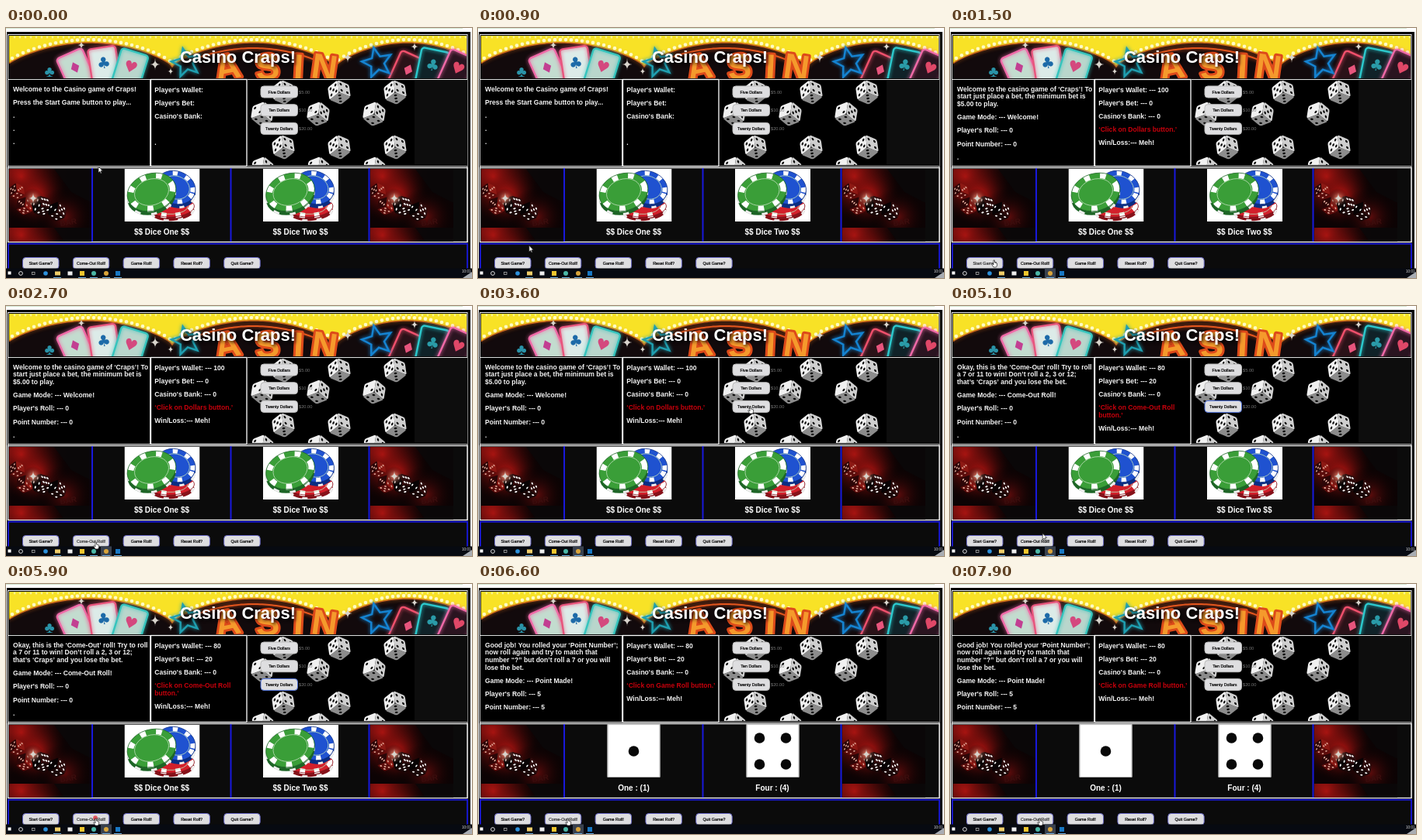
Recreate the animation shown at these times as an HTML page with a canvas. Size 600 by 323 pixels, loop 8000 ms.

```html
<!DOCTYPE html>
<html lang="en">
<head>
<meta charset="utf-8">
<title>Casino Craps</title>
<style>
html, body { margin: 0; width: 100%; height: 100%; overflow: hidden; background: #fff; }
canvas { display: block; }
</style>
</head>
<body>
<canvas id="stage" width="600" height="323"></canvas>
<script>
const c = document.getElementById('stage').getContext('2d');
const LOOP = 8000, STEP = 100, TAU = Math.PI * 2;
const SANS = '"Liberation Sans", Arial, sans-serif';
const BLUE = '#1818dc';

function rect(x, y, w, h, fill) { c.fillStyle = fill; c.fillRect(x, y, w, h); }
function frame(x, y, w, h, color, lw = 1) {
  c.strokeStyle = color; c.lineWidth = lw; c.strokeRect(x, y, w, h);
}
function disc(x, y, r, fill) {
  c.fillStyle = fill; c.beginPath(); c.arc(x, y, r, 0, TAU); c.fill();
}
function poly(points, fill) {
  c.beginPath();
  for (const [x, y] of points) c.lineTo(x, y);
  c.closePath();
  c.fillStyle = fill; c.fill();
}
function text(s, x, y, size, fill, align = 'left', weight = 'bold') {
  c.font = `${weight} ${size}px ${SANS}`;
  c.textAlign = align; c.fillStyle = fill; c.fillText(s, x, y);
}
function clipped(x, y, w, h, draw) {
  c.save(); c.beginPath(); c.rect(x, y, w, h); c.clip(); draw(); c.restore();
}
function glow(x, y, r, color) {
  const g = c.createRadialGradient(x, y, 0, x, y, r);
  g.addColorStop(0, color); g.addColorStop(1, 'transparent');
  rect(x - r, y - r, 2 * r, 2 * r, g);
}

function pips(n) {
  const p = [];
  if (n % 2) p.push([.5, .5]);
  if (n > 1) p.push([.25, .25], [.75, .75]);
  if (n > 3) p.push([.75, .25], [.25, .75]);
  if (n > 5) p.push([.25, .5], [.75, .5]);
  return p;
}
// A cube seen corner-on: three faces that meet at (x, y).
function cube(x, y, r, turn, faces, colors, dot) {
  faces.forEach((n, i) => {
    const a = turn + i * TAU / 3, b = a + TAU / 3;
    c.save();
    c.transform(r * Math.cos(a), r * Math.sin(a), r * Math.cos(b), r * Math.sin(b), x, y);
    c.fillStyle = colors[i];
    c.beginPath(); c.roundRect(0, 0, 1, 1, .16); c.fill();
    for (const [u, v] of pips(n)) disc(u, v, .1, dot);
    c.restore();
  });
}

// ---- Neon banner ----
function neon(color, lw, trace) {
  c.save();
  c.shadowColor = color; c.shadowBlur = 5; c.strokeStyle = color; c.lineWidth = lw;
  c.beginPath(); trace(); c.stroke(); c.restore();
}
function star(x, y, r) {
  for (let i = 0; i < 10; i++) {
    const a = i * TAU / 10 - 1.8, d = i % 2 ? r * .45 : r;
    c.lineTo(x + d * Math.cos(a), y + d * Math.sin(a));
  }
  c.closePath();
}
function sparkle(x, y, r) {
  c.fillStyle = '#d8d4cc';
  c.beginPath(); c.moveTo(x, y - r);
  for (const [dx, dy] of [[1, 0], [0, 1], [-1, 0], [0, -1]])
    c.quadraticCurveTo(x, y, x + dx * r * .8, y + dy * r);
  c.fill();
}
function card(x, y, turn, color, fill, suit, suitColor) {
  c.save(); c.translate(x, y); c.rotate(turn);
  const outline = () => c.roundRect(-18, -22, 36, 58, 4);
  c.beginPath(); outline(); c.fillStyle = fill; c.fill();
  neon(color, 2.4, outline);
  c.font = '20px "DejaVu Sans", sans-serif'; c.textAlign = 'center';
  c.fillStyle = suitColor; c.fillText(suit, 0, 5);
  c.restore();
}
// Three dark mounds rise into the yellow sign.
const mounds = [[0, 214], [214, 424], [424, 610]];
function edge(x) {
  const [a, b] = mounds.find(m => x < m[1]);
  return 50 - 31 * Math.pow(Math.sin((x - a) / (b - a) * Math.PI), .7);
}
function banner() {
  clipped(4, 10, 589, 55, () => {
    rect(4, 10, 589, 55, '#f8e226');
    const curve = [];
    for (let x = 4; x <= 594; x += 3) curve.push([x, edge(x)]);
    poly([[4, 70], ...curve, [594, 70]], '#120a0c');
    neon('#c8641a', 1.5, () => curve.forEach(([x, y]) => c.lineTo(x, y)));
    for (let x = 8; x < 593; x += 7) {
      disc(x, edge(x) - 4, 2.3, '#fffbc4');
      disc(x + 3, 12, 1.4, '#fff48c');
    }
    neon('#e2561e', 2, () => {
      for (let x = 240; x < 402; x += 3) c.lineTo(x, edge(x) + 7);
    });

    text('♣', 56, 63, 20, '#2a93a8', 'center', 'normal');
    card(90, 53, -.42, '#f06aa8', '#c3dccf', '♦', '#c23f92');
    card(126, 47, -.15, '#e8557d', '#dcebe8', '♣', '#1c6aa8');
    card(160, 52, .3, '#35c4bd', '#b9d6cc', '♥', '#d4487e');
    card(517, 56, .42, '#f0506c', '#2a1218', '♦', '#e8557d');
    card(549, 50, .2, '#2cc8cc', '#102228', '♣', '#2a9ba8');
    card(581, 54, .42, '#f06aa8', '#2a1420', '♥', '#e04868');
    neon('#1f9fb0', 2.5, () => star(232, 45, 19));
    neon('#1583d1', 2.5, () => star(478, 45, 20));

    c.lineJoin = 'round'; c.textAlign = 'center'; c.font = `bold 46px ${SANS}`;
    [['A', 288, -.2], ['S', 338, -.1], ['I', 376, .05], ['N', 408, .14]].forEach(([s, x, turn]) => {
      c.save(); c.translate(x, 66); c.rotate(turn);
      c.strokeStyle = '#dd4a1a'; c.lineWidth = 6; c.strokeText(s, 0, 0);
      c.fillStyle = '#f59a2c'; c.fillText(s, 0, 0);
      c.restore();
    });
    for (const [x, y, r] of [[97, 22, 6], [192, 47, 8], [212, 56, 5], [440, 38, 7], [526, 24, 6]])
      sparkle(x, y, r);
  });
  c.save();
  c.shadowColor = '#000'; c.shadowBlur = 4; c.shadowOffsetX = 2; c.shadowOffsetY = 2;
  text('Casino Craps!', 298.5, 45, 22, '#fff', 'center');
  c.restore();
}

// ---- Pictures ----
function whiteDice() {
  const shades = ['#8c8c8c', '#f0f0f0', '#cfcfcf'];
  clipped(311, 68, 215, 109, () => {
    rect(311, 68, 215, 109, '#000');
    for (let row = 0; row < 2; row++) for (let col = 0; col < 3; col++) {
      const x = 311 + col * 72, y = 67 + row * 71;
      cube(x + 46, y + 16, 16, .38, [3, 5, 4], shades, '#080808');
      cube(x + 19, y + 44, 16, .68, [4, 2, 5], shades, '#080808');
    }
  });
}
function redDice(x) {
  clipped(x, 182, 107, 94, () => {
    for (const y of [182, 258]) {
      c.save(); c.translate(x, y);
      c.beginPath(); c.rect(0, 0, 107, 76); c.clip();
      rect(0, 0, 107, 76, '#0c0304');
      glow(16, 10, 62, '#d81a16');
      glow(34, 34, 44, '#c01512');
      glow(72, 62, 38, '#5c0c0c');
      poly([[58, 0], [107, 0], [107, 44], [80, 30]], 'rgba(10,8,9,.8)');
      const red = ['#5a0d0c', '#2c0607', '#8c1813'];
      const black = ['#1a0808', '#080304', '#2e0e0e'];
      cube(10, 29, 11, .4, [4, 5, 3], red, '#e8b0a0');
      cube(20, 48, 12, .7, [5, 3, 4], red, '#e8b0a0');
      cube(42, 48, 14, .25, [5, 4, 6], black, '#fff');
      cube(62, 55, 13, .65, [4, 2, 5], black, '#fff');
      glow(31, 38, 13, '#ff9a80');
      sparkle(31, 38, 7);
      c.translate(66, 74); c.rotate(-.15);
      text('BAR', 0, 0, 10, '#3c0e0e');
      c.restore();
    }
  });
}
function chip(x, y, rx, ry, turn, color, side) {
  c.save(); c.translate(x, y);
  const oval = k => { c.beginPath(); c.ellipse(0, 0, rx * k, ry * k, turn, 0, TAU); };
  c.translate(0, 5);
  oval(1); c.fillStyle = side; c.fill();
  c.setLineDash([rx * .24, rx * .42]);
  c.strokeStyle = '#eee'; c.lineWidth = 3; oval(.96); c.stroke();
  c.translate(0, -5);
  oval(1); c.fillStyle = color; c.fill();
  c.lineWidth = rx * .24; c.strokeStyle = '#fff'; oval(.87); c.stroke();
  c.setLineDash([]); c.lineWidth = .8;
  c.strokeStyle = side; oval(1); c.stroke();
  c.strokeStyle = '#bfe0bb'; oval(.7); c.stroke();
  c.restore();
}
function chips(x) {
  clipped(x, 182, 97, 68, () => {
    rect(x, 182, 97, 68, '#fff');
    chip(x + 62, 232, 28, 12, -.08, '#d3202b', '#86121a');
    chip(x + 66, 206, 26, 21, .35, '#1f52d0', '#0b2d82');
    chip(x + 35, 212, 32, 24, -.3, '#3a9e38', '#1d6526');
  });
}
function face(x, n) {
  rect(x, 182, 68, 67, '#fff');
  frame(x + .5, 181.5, 67, 68, '#aaa');
  for (const [u, v] of pips(n)) disc(x + u * 68, 182 + v * 68, 6.8, '#080808');
}

// ---- Page states ----
const states = [
  { from: 0, info: ['Welcome to the Casino game of Craps!', 'Press the Start Game button to play...', '.', '.', '.'],
    money: ['Player\'s Wallet:', 'Player\'s Bet:', 'Casino\'s Bank:', '', '.'] },
  { from: 1300, active: true,
    info: ['Welcome to the casino game of ‘Craps’! To\nstart just place a bet, the minimum bet is\n$5.00 to play.',
      'Game Mode: --- Welcome!', 'Player\'s Roll: --- 0', 'Point Number: --- 0', '.'],
    money: money(100, 0, '‘Click on Dollars button.’') },
  { from: 3700, active: true, focus: true,
    info: ['Okay, this is the ‘Come-Out’ roll! Try to roll\na 7 or 11 to win! Don’t roll a 2, 3 or 12;\nthat’s ‘Craps’ and you lose the bet.',
      'Game Mode: --- Come-Out Roll!', 'Player\'s Roll: --- 0', 'Point Number: --- 0', '.'],
    money: money(80, 20, '‘Click on Come-Out Roll\nbutton.’') },
  { from: 6000, active: true, rolled: true,
    info: ['Good job! You rolled your ‘Point Number’;\nnow roll again and try to match that\nnumber “?” but don’t roll a 7 or you will\nlose the bet.',
      'Game Mode: --- Point Made!', 'Player\'s Roll: --- 5', 'Point Number: --- 5'],
    money: money(80, 20, '‘Click on Game Roll button.’') }
];
function money(wallet, bet, hint) {
  return [`Player's Wallet: --- ${wallet}`, `Player's Bet: --- ${bet}`, 'Casino\'s Bank: --- 0', hint, 'Win/Loss:--- Meh!'];
}
function paragraphs(list, x, y, redIndex) {
  list.forEach((p, i) => {
    p.split('\n').forEach((line, k) => {
      if (k) y += 9.8;
      text(line, x, y, 8.57, i === redIndex ? '#c8000c' : '#f4f4f4');
    });
    y += 17.1;
  });
}
function button(label, x, y, w, h, border, fill = '#000') {
  c.beginPath(); c.roundRect(x, y, w, h, 4);
  c.fillStyle = '#dedee0'; c.fill();
  c.strokeStyle = border; c.lineWidth = 1; c.stroke();
  text(label, x + w / 2, y + h / 2 + 2, 5.4, fill, 'center', 'normal');
  c.strokeStyle = fill; c.lineWidth = .2;
  c.strokeText(label, x + w / 2, y + h / 2 + 2);
}

function taskbar(active) {
  rect(0, 310.5, 600, 12.5, '#070a11');
  if (active) rect(122, 310.5, 14, 12.5, '#39414e');
  rect(2.5, 314.5, 4, 4, '#fff');
  c.strokeStyle = '#ddd'; c.lineWidth = 1;
  c.beginPath(); c.arc(19, 317, 2.4, 0, TAU); c.stroke();
  frame(33.5, 315.5, 3.5, 3, '#aaa', .8);
  disc(51, 317, 2.8, '#2d91dc');
  rect(63, 314.5, 7, 5, '#f0cd69');
  rect(79.5, 314.5, 6, 5, '#eee');
  rect(95, 314, 6, 6, '#f1c62d');
  disc(113, 317, 3, '#4bb7a6');
  disc(129, 317, 3, '#d9a43a');
  rect(141, 314, 6, 6, '#1878c4');
  for (const x of [61, 93, 108, 124, 139]) rect(x, 322, 10, 1, '#69a9dc');
  text('10:01', 587, 316, 4.6, '#ddd', 'left', 'normal');
  poly([[588, 323], [600, 315], [600, 323]], '#a9adb3');
}

// ---- Pointer ----
const path = [[0, 119, 179], [300, 119, 179], [1100, 56, 300], [1900, 56, 300], [2500, 115, 305],
  [2800, 115, 305], [3500, 350, 130], [3900, 350, 130], [4300, 191, 136], [4500, 191, 136],
  [5200, 115, 303], [8000, 115, 303]];
function pointerAt(t) {
  const i = path.findIndex(p => p[0] > t), [t0, x0, y0] = path[i - 1], [t1, x1, y1] = path[i];
  const u = (t - t0) / (t1 - t0), e = u * u * (3 - 2 * u);
  return [x0 + (x1 - x0) * e, y0 + (y1 - y0) * e];
}
function pointer(x, y, hand, beam) {
  c.save(); c.translate(x, y);
  if (beam) {
    c.strokeStyle = '#eee'; c.lineWidth = 1;
    c.beginPath();
    c.moveTo(-2, -4); c.lineTo(2, -4); c.moveTo(0, -4); c.lineTo(0, 4); c.moveTo(-2, 4); c.lineTo(2, 4);
    c.stroke();
  } else {
    poly(hand ? [[0, 0], [1.4, 0], [1.6, 3], [4.6, 4], [4.6, 7], [3.5, 9], [0, 9], [-2.4, 5], [-1.6, 4.4], [0, 6]]
      : [[0, 0], [0, 8], [1.8, 6.3], [3, 9], [4.2, 8.4], [3, 5.8], [5.4, 5.6]], '#fff');
    c.strokeStyle = '#222'; c.lineWidth = .7; c.stroke();
  }
  c.restore();
}

function draw(t) {
  const s = states.findLast(v => v.from <= t), [mx, my] = pointerAt(t);
  rect(0, 0, 600, 323, '#fff');
  rect(0, 0, 588, 1, '#d5e8d3');
  rect(1, 5, 597, 318, '#050505');
  frame(2.5, 8.5, 591.5, 268, '#eee');
  banner();

  rect(311, 67, 283, 111, '#0d0d0d');
  whiteDice();
  rect(3, 67, 182, 111, '#000');
  frame(2.5, 66.5, 183, 112, '#ddd');
  rect(187, 67, 123, 111, '#000');
  frame(186.5, 66.5, 123.5, 112, '#fff', 1.3);
  rect(311, 66, 283, 1, '#ddd');
  rect(311, 178, 283, 1, '#aaa');
  paragraphs(s.info, 9, 81.6, -1);
  paragraphs(s.money, 191.3, 82.5, 3);

  ['Five', 'Ten', 'Twenty'].forEach((name, i) => {
    const y = 75 + i * 23.7;
    text(['$5.00', '$10.00', '$20.00'][i], 377, y + 9.5, 5.7, '#777', 'left', 'normal');
    button(name + ' Dollars', 328, y, 47.5, 15, s.focus && i === 2 ? '#4c6ed8' : '#bbb');
  });

  rect(3, 180, 591, 97, '#0b0b0b');
  frame(2.5, 180.5, 591.5, 96, '#f0f0f0', 1.4);
  redDice(4); redDice(469);
  for (const x of [110, 288.5, 466.5]) rect(x, 181, 2, 95, BLUE);
  if (s.rolled) { face(166.5, 1); face(345.5, 4); } else { chips(152.5); chips(331); }
  const labels = s.rolled ? ['One : (1)', 'Four : (4)'] : ['$$ Dice One $$', '$$ Dice Two $$'];
  labels.forEach((label, i) => text(label, 200.5 + i * 178.5, 267, 10, '#fff', 'center'));

  rect(3, 278, 591, 45, '#0b0b0b');
  frame(3, 278.8, 591, 50, BLUE, 1.8);
  const names = ['Start Game?', 'Come-Out Roll!', 'Game Roll!', 'Reset Roll?', 'Quit Game?'];
  const over = (x, y, w, h) => mx >= x && mx <= x + w && my >= y && my <= y + h;
  names.forEach((name, i) => {
    const x = 21.5 + i * 64.8;
    button(name, x, 296.5, 46.5, 15, '#6262c0', over(x, 296, 47, 15) ? '#333' : '#000');
  });
  taskbar(s.active);

  const hand = over(21, 296, 310, 15) || over(328, 75, 48, 63);
  if (t >= 5800 && t < 6000) disc(mx, my - 1, 2.8, 'rgba(225,35,50,.75)');
  pointer(mx, my, hand, over(187, 67, 123, 111));
}

let last = -1;
const start = performance.now();
function tick(now) {
  const t = Math.floor(Math.max(0, now - start) % LOOP / STEP) * STEP;
  if (t !== last) draw(last = t);
  requestAnimationFrame(tick);
}
draw(0);
requestAnimationFrame(tick);
</script>
</body>
</html>
```
